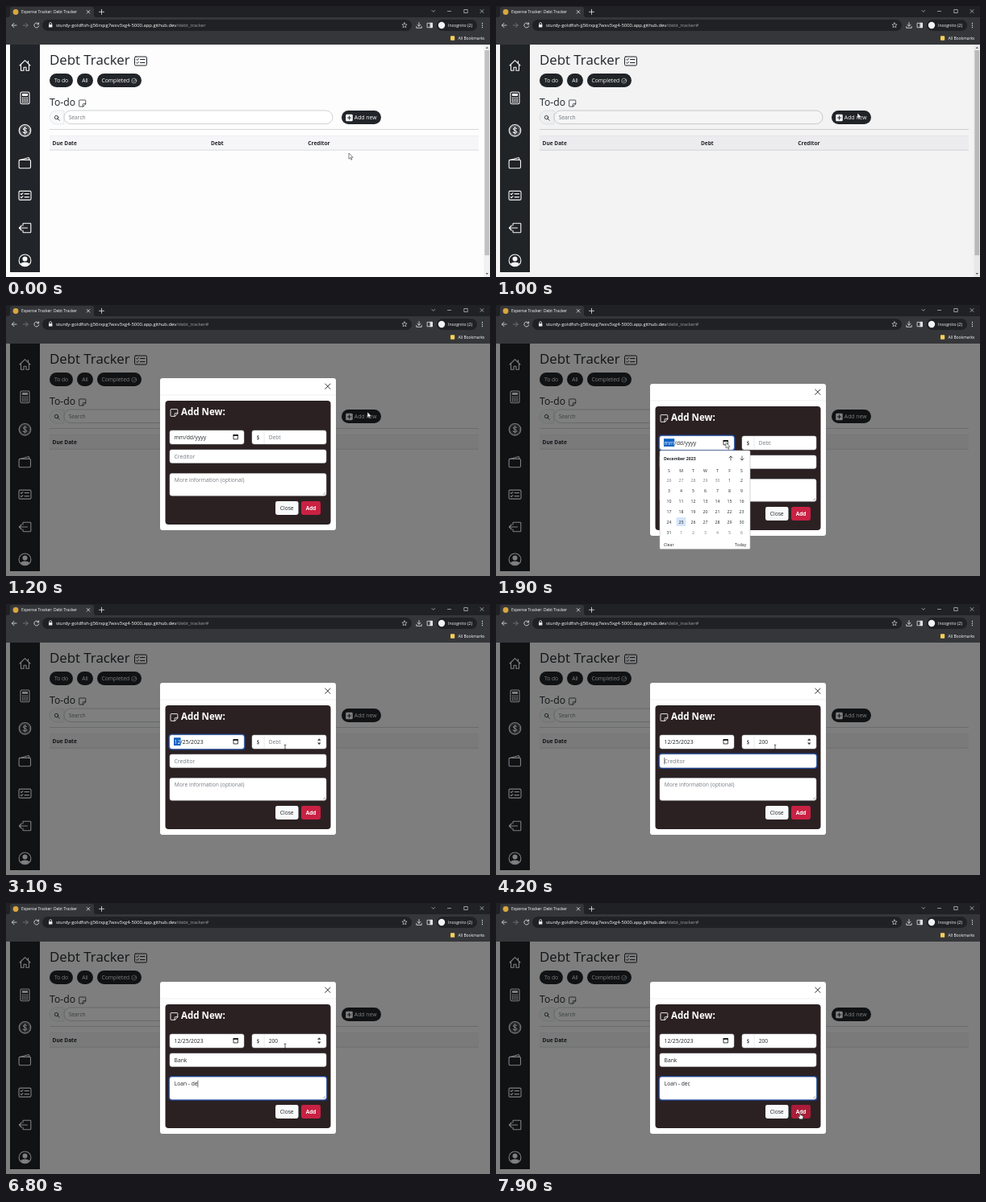
An HTML page that plays this animation: 600x337 px, repeating every 8 s.

```html
<!DOCTYPE html>
<html lang="en">
<head>
<meta charset="utf-8">
<title>Debt Tracker</title>
<style>
  html, body { margin: 0; width: 100%; height: 100%; overflow: hidden; background: #fdfdfe; }
  svg { display: block; width: 100vw; height: 100vh; }
  text { font: 6.7px "Open Sans", "Noto Sans", sans-serif; fill: #212529; white-space: pre; }
  .bold { font-weight: 700; }
  .mid { text-anchor: middle; }
  .light { fill: #fff; }
  .hint { fill: #757b81; }
  .icon { fill: none; stroke: #212529; stroke-linecap: round; stroke-linejoin: round; }
  .icon.light { stroke: #fff; fill: none; }
  .icon .solid { fill: #fff; stroke: none; }
  .bar { fill: none; stroke: #e8eaed; stroke-linecap: round; stroke-linejoin: round; }
  .bar text { stroke: none; }
  .field { fill: #fff; stroke: #ced4da; stroke-width: .5; }
</style>
</head>
<body>
<svg id="stage" viewBox="0 0 600 337" preserveAspectRatio="none"></svg>
<script>
const LOOP = 8000, STEP = 100;

const shapes = {
  house: '<path d="M1.5 8 8 1.7 14.5 8M3 7v7.3h3.5v-4h3v4H13V7M12 5V2.5"/>',
  calculator: '<rect x="2.5" y=".6" width="11" height="14.8" rx="1.5"/><rect class="solid" x="4.5" y="2.5" width="7" height="3"/>' +
    [0, 1, 2].map(r => [0, 1, 2].map(c =>
      `<rect class="solid" x="${4.4 + c * 2.7}" y="${7.2 + r * 2.5}" width="1.8" height="1.6"/>`).join('')).join(''),
  coin: '<circle cx="8" cy="8" r="7.3"/><circle cx="8" cy="8" r="5.8" stroke-width=".5"/>' +
    '<path d="M10.4 6.1C10 4.3 5.8 4.3 5.8 6.3c0 2.2 4.7 1.1 4.7 3.4 0 2-4.4 2-4.9 0M8 3.8v8.4"/>',
  wallet: '<rect x=".6" y="4.2" width="14.4" height="10.3" rx="1.5"/><path d="M1 4.6 12 1.5q1.3-.2 1.3 1v1.6"/>',
  checklist: '<rect x=".5" y="2.5" width="15" height="11" rx="1.4"/>' +
    '<path d="M7.5 6H13M7.5 10H13M2.7 6l.9.9L5.4 5M2.7 10l.9.9L5.4 9"/>',
  exit: '<path d="M5.5 5V3q0-.8.8-.8h8.2q.8 0 .8.8v10q0 .8-.8.8H6.3q-.8 0-.8-.8v-2M11 8H.8M3.8 5l-3 3 3 3"/>',
  person: '<circle cx="8" cy="8" r="7.4"/><circle class="solid" cx="8" cy="6" r="3"/>' +
    '<path class="solid" d="M2.5 12.4C4 9.3 12 9.3 13.5 12.4 10.6 16.2 5.4 16.2 2.5 12.4"/>',
  sticky: '<path d="M14.5 9V2.5q0-1-1-1h-11q-1 0-1 1v11q0 1 1 1H9zM9 14.5V10q0-1 1-1h4.5"/>',
  check: '<circle cx="8" cy="8" r="7.2"/><path d="m5 8 2.3 2.6L14 3.5"/>',
  search: '<circle cx="6.5" cy="6.5" r="5"/><path d="m10.3 10.3 4.7 4.7"/>',
  plus: '<rect class="solid" width="16" height="16" rx="2.5"/><path stroke="#212529" d="M8 4v8M4 8h8"/>'
};

const icon = (name, cx, cy, size, cls = '', weight = 1) =>
  `<g class="icon ${cls}" stroke-width="${weight}" transform="translate(${cx - size / 2} ${cy - size / 2}) scale(${size / 16})">${shapes[name]}</g>`;
const rect = (x, y, w, h, fill, r = 0, more = '') =>
  `<rect x="${x}" y="${y}" width="${w}" height="${h}" rx="${r}" fill="${fill}" ${more}/>`;
const text = (x, y, str, cls = '', size = 6.7, more = '') =>
  `<text x="${x}" y="${y}" class="${cls}" style="font-size:${size}px" ${more}>${str}</text>`;
const pill = (x, y, w) => rect(x, y, w, 17, '#212529', 8.5);
const field = (x, y, w, h) => `<rect class="field" x="${x}" y="${y}" width="${w}" height="${h}" rx="2.4"/>`;

function browserBar() {
  return rect(0, 0, 600, 48, '#35363a') + rect(0, 0, 600, 14, '#202124') +
    '<path d="M2 14q3 0 3-3V4q0-3 3-3h98q3 0 3 3v7q0 3 3 3z" fill="#35363a"/>' +
    '<circle cx="12" cy="7.5" r="3.4" fill="#d9a73c"/>' +
    text(19, 9.3, 'Expense Tracker: Debt Tracker', 'light', 4.95) +
    rect(45, 17, 458, 14, '#202124', 7) + rect(534, 17, 50, 14, '#202124', 7) +
    text(62, 26.2, 'sturdy-goldfish-jj56rxpg7wxv3xg4-5000.app.github.dev' +
      '<tspan fill="#9aa0a6">/debt_tracker<tspan id="hash">#</tspan></tspan>', 'light', 5.87) +
    '<circle cx="540" cy="24" r="4.2" fill="#f1f3f4"/>' + text(548, 25.9, 'Incognito (2)', 'light', 5.2) +
    rect(551, 37.3, 5.2, 5.5, '#f6cf57', .7) + text(560.5, 41.8, 'All Bookmarks', 'light', 4.95) +
    `<g class="bar" stroke-width=".8">
      <path d="m100.2 5.5 3.6 3.6m0-3.6-3.6 3.6M115.5 7.3h6M118.5 4.3v6"/>
      <path d="M13 24H7.5m2.5-2.7L7.3 24l2.7 2.7M40.4 22.3a3 3 0 1 0 .4 2.5M40.6 20.8v2h-2"/>
      <path stroke="#7d8186" d="M21.5 24H27m-2.5-2.7 2.7 2.7-2.7 2.7"/>
      <path d="M53.8 23v-1a1.4 1.4 0 0 1 2.8 0v1"/><rect x="53" y="23" width="4.4" height="3.6" rx=".5" fill="#e8eaed" stroke="none"/>
      <path stroke-width=".6" d="m494 20.8.9 2 2.2.2-1.7 1.5.5 2.2-1.9-1.1-1.9 1.1.5-2.2-1.7-1.5 2.2-.2z"/>
      <path d="M512 20.5v4.7m-2-2 2 2 2-2M508.8 25.5v1.8h6.4v-1.8M522.5 21.3h6v5.4h-6z"/>
      <path fill="#e8eaed" d="M526.2 21.3h2.3v5.4h-2.3z"/>
      <path stroke-width="1.3" d="M590.5 21.5v0M590.5 24v0M590.5 26.5v0"/>
      <path stroke-width=".6" d="m528 5.5 1.8 1.8 1.8-1.8M547.5 6.5h4M568.2 4.5h4v4h-4zM588 4.5l4 4m0-4-4 4"/>
    </g>`;
}

function page() {
  const side = ['house', 'calculator', 'coin', 'wallet', 'checklist', 'exit', 'person'];
  return rect(0, 48, 600, 289, '#fdfdfe') + rect(5, 48, 37, 283, '#212529') +
    side.map((name, i) => icon(name, 23.5, 74 + i * 40.4, 16, 'light', 1.1)).join('') +
    text(54, 72.6, 'Debt Tracker', '', 16.85) + icon('checklist', 167, 68.5, 16) +
    pill(54, 84, 29) + text(68.5, 95, 'To do', 'light mid') +
    pill(88, 84, 20) + text(98, 95, 'All', 'light mid') +
    pill(113, 84, 55) + text(118.4, 95, 'Completed', 'light', 6.8) + icon('check', 158.7, 93, 6.6, 'light', 1.3) +
    text(54, 123.6, 'To-do', '', 12.2) + icon('sticky', 94.7, 121, 10, '', 1.2) +
    '<path d="M72 130H62.5a8.5 8.5 0 0 0 0 17H72z" fill="#f8f9fa" stroke="#ced4da" stroke-width=".5"/>' +
    icon('search', 63.2, 139.2, 7, '', 1.9) +
    rect(72, 130, 333, 16.6, '#fff', 8.3, 'stroke="#adb2b7" stroke-width=".6"') + text(77.7, 140.8, 'Search', 'hint') +
    pill(416, 130, 49) + icon('plus', 425.5, 139, 8.6, 'light', 1.8) + text(431.8, 140.9, 'Add new', 'light', 6.85) +
    rect(54, 153.3, 532, .7, '#c6c8ca') +
    rect(54, 161.5, 532, 17.5, '#f6f6f8') + rect(54, 161, 532, .5, '#e3e5e8') + rect(54, 178.8, 532, .7, '#c9cdd1') +
    text(57.6, 172.7, 'Due Date', 'bold', 6.55) + text(254, 172.7, 'Debt', 'bold', 6.55) + text(374.3, 172.7, 'Creditor', 'bold', 6.65) +
    '<g id="scroll">' + rect(592.5, 48, 7.5, 289, '#f1f1f1') + rect(593.4, 55, 5.8, 255, '#c1c1c1') +
    '<path fill="#505050" d="m594.7 52.7 1.6-2 1.6 2zM594.7 332l1.6 2 1.6-2z"/></g>';
}

function modal() {
  return rect(191, 98, 218, 189, '#fff', 3) + rect(191, 118.7, 218, .5, '#dee2e6') +
    '<path class="icon" stroke-width=".9" d="m395.7 105 6.2 6.4m0-6.4-6.2 6.4"/>' +
    rect(197.5, 126, 205, 154, '#2b2123', 4) +
    icon('sticky', 208.4, 141, 10.8, 'light', 1.3) + text(217, 144, 'Add New:', 'bold light', 11.55) +
    '<rect id="ring" rx="3" fill="none" stroke="#0d5cf0" stroke-opacity=".55" stroke-width="1.7"/>' +
    field(203, 163, 92, 17) + field(305, 163, 92, 17) + field(203, 187, 194, 16.5) + field(203, 216.5, 194, 27.7) +
    rect(208, 166.2, 8.6, 9.8, '#0f62c4', 0, 'id="mark"') + text(208.5, 173.7, '', '', 6.8, 'id="date"') +
    '<path d="M282 168.7h5.4v5.2H282z" fill="none" stroke="#111" stroke-width=".8"/>' +
    rect(281.6, 168, 6.2, 1.8, '#111') +
    text(312.5, 173.7, '$', 'mid') + rect(319.8, 163.3, .5, 16.4, '#ced4da') +
    text(325.7, 173.7, '', '', 6.65, 'id="debt"') +
    '<path id="spin" fill="#333" d="m386 169.8 2.2-2.5 2.2 2.5zM386 172.6l2.2 2.5 2.2-2.5z"/>' +
    text(208.6, 197.6, '', '', 6.75, 'id="creditor"') + text(208.8, 227.4, '', '', 6.7, 'id="info"') +
    '<path d="m393 243 3-3m-1.4 3 1.4-1.4" stroke="#777" stroke-width=".5"/>' +
    rect(0, 0, .6, 8.6, '#111', 0, 'id="caret"') +
    rect(334, 251, 28.5, 17, '#f8f9fa', 2.4) + text(348.2, 262.1, 'Close', 'mid') +
    rect(366, 251, 24, 17, '#c92143', 2.4, 'id="add"') + text(378, 262.1, 'Add', 'bold light mid', 6.5);
}

function picker() {
  let days = '';
  for (let i = 0; i < 42; i++) {
    const n = i - 4, label = n < 1 ? n + 30 : n > 31 ? n - 31 : n;
    const x = 214.5 + i % 7 * 15, y = 220 + Math.floor(i / 7) * 13;
    if (n === 25) days += rect(x - 6, y - 8, 12, 11, '#d5e5fb', 1.5);
    days += text(x, y, label, n < 1 || n > 31 ? 'hint mid' : 'mid', 5.2);
  }
  return rect(203, 181, 112, 122.5, '#fff', 1.5, 'stroke="#b5b5b5" stroke-width=".6"') +
    text(208, 193, 'December 2023', 'bold', 5.2) +
    '<path class="icon" stroke-width=".7" d="M291 193v-5m-2 2 2-2 2 2M305 188v5m-2-2 2 2 2-2"/>' +
    [...'SMTWTFS'].map((d, i) => text(214.5 + i * 15, 207.5, d, 'mid', 5.2)).join('') + days +
    text(208, 299.5, 'Clear', '', 5.2, 'fill="#1a73e8"') + text(296, 299.5, 'Today', '', 5.2);
}

const pointers = {
  arrow: '<path d="M0 0v7.2l1.7-1.5 1.2 2.6 1.1-.5-1.2-2.5h2.3z" fill="#fff" stroke="#111" stroke-width=".5"/>',
  beam: '<path d="M-1.3-3q1.3 0 1.3.7v4.9q0 .7-1.3.7M1.3-3Q0-3 0-2.3" fill="none" stroke="#111" stroke-width=".7"/>',
  hand: '<path d="M-.7.3q.8-.8 1.3 0v2.5l2.6.6q.8.3.6 1.2l-.5 3.2h-3.9l-2-3q.3-1 1.9.2z" fill="#fff" stroke="#111" stroke-width=".5"/>'
};

document.getElementById('stage').innerHTML = page() +
  rect(0, 48, 600, 289, '#000', 0, 'id="shade"') + browserBar() +
  `<g id="modal">${modal()}</g><g id="picker">${picker()}</g><g id="pointer">` +
  Object.entries(pointers).map(([k, s]) => `<g id="${k}">${s}</g>`).join('') + '</g>';

const el = {};
document.querySelectorAll('[id]').forEach(node => el[node.id] = node);
const show = (node, on) => { node.style.display = on ? '' : 'none'; };

// Each step is [start time, value]; the latest started one holds.
const at = (steps, t) => steps.reduce((v, s) => t >= s[0] ? s[1] : v, steps[0][1]);
const shade = [[0, 0], [1000, .04], [1100, .39], [1200, .5]];
const drop = [[0, -22], [1200, -7], [1300, -1.2], [1400, 0]];
const focus = [[0, ''], [1700, 'date'], [3400, 'debt'], [4100, 'creditor'], [5000, 'info']];
const shape = [[0, 'arrow'], [3000, 'beam'], [7700, 'arrow'], [7800, 'hand']];
const values = {
  date: [[0, ''], [2600, '12/25/2023']],
  debt: [[0, ''], [3600, '2'], [3700, '20'], [3900, '200']],
  creditor: [[0, ''], [4400, 'B'], [4500, 'Ba'], [4700, 'Ban'], [4800, 'Bank']],
  info: [[0, ''], [5200, 'L'], [5300, 'Lo'], [5400, 'Loa'], [5700, 'Loan'], [6100, 'Loan '], [6300, 'Loan -'],
    [6400, 'Loan - '], [6500, 'Loan - d'], [6700, 'Loan - de'], [6900, 'Loan - dec']]
};
const hints = { date: 'mm/dd/yyyy', debt: 'Debt', creditor: 'Creditor', info: 'More information (optional)' };
const boxes = { date: [203, 163, 92, 17], debt: [305, 163, 92, 17], creditor: [203, 187, 194, 16.5], info: [203, 216.5, 194, 27.7] };
const path = [[0, 425, 183], [600, 425, 183], [1000, 448, 133], [1200, 448, 133], [1500, 330, 161], [1700, 285, 171],
  [1900, 285, 171], [2400, 230, 268], [2600, 230, 268], [3000, 346, 178], [7600, 346, 178], [7800, 377, 261], [LOOP, 377, 261]];

function pointerAt(t) {
  const i = path.findIndex(p => p[0] > t), a = path[i - 1], b = path[i];
  const k = (t - a[0]) / (b[0] - a[0]), e = k * k * (3 - 2 * k);
  return [a[1] + (b[1] - a[1]) * e, a[2] + (b[2] - a[2]) * e];
}

function draw(t) {
  const open = t >= 1200, active = at(focus, t);
  show(el.hash, t >= 1000);
  show(el.scroll, t < 1100);
  el.shade.setAttribute('opacity', at(shade, t));
  show(el.modal, open);
  el.modal.setAttribute('transform', `translate(0 ${at(drop, t)})`);
  show(el.picker, t >= 1800 && t < 2600);

  for (const name in values) {
    const value = at(values[name], t);
    el[name].textContent = value || hints[name];
    el[name].style.fill = value || name === 'date' ? '#212529' : '#757b81';
  }
  const marked = active === 'date';
  if (marked) {
    const s = el.date.textContent;
    el.date.innerHTML = `<tspan fill="#fff">${s.slice(0, 2)}</tspan>${s.slice(2)}`;
    el.mark.setAttribute('width', s[0] === 'm' ? 13.2 : 8.6);
  }
  show(el.mark, marked);

  show(el.ring, active);
  show(el.caret, active && !marked && !(t >= 7000 && t < 7400) && t < 7700);
  if (active) {
    const [x, y, w, h] = boxes[active];
    Object.entries({ x: x - .7, y: y - .7, width: w + 1.4, height: h + 1.4 })
      .forEach(([k, v]) => el.ring.setAttribute(k, v));
    const node = el[active], typed = at(values[active], t);
    el.caret.setAttribute('x', +node.getAttribute('x') + (typed && open ? node.getComputedTextLength() : 0));
    el.caret.setAttribute('y', node.getAttribute('y') - 6.8);
  }
  show(el.spin, t >= 3000 && t < 7700);
  el.add.setAttribute('fill', t >= 7800 ? '#ab1c39' : '#c92143');

  const [px, py] = pointerAt(t), kind = at(shape, t);
  el.pointer.setAttribute('transform', `translate(${px} ${py})`);
  for (const name in pointers) show(el[name], name === kind);
}

const start = performance.now();
function tick() {
  const t = (performance.now() - start) % LOOP;
  draw(Math.floor(t / STEP) * STEP);
  requestAnimationFrame(tick);
}
tick();
</script>
</body>
</html>
```
